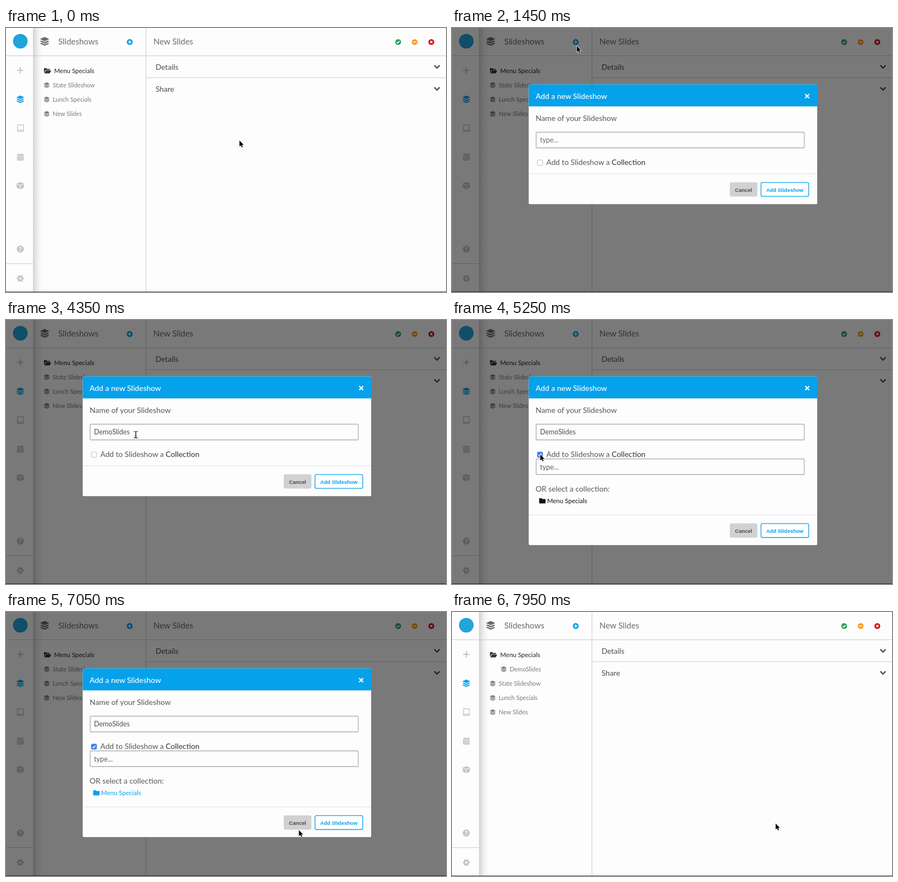
Write an HTML page that moves like this. It is 800 px wide and 480 px high and loops after 8 s.

```html
<!DOCTYPE html>
<html lang="en">
<head>
<meta charset="utf-8">
<title>Slideshows</title>
<style>
  html, body { margin: 0; width: 100%; height: 100%; overflow: hidden; background: #fefdfe; }
  svg { display: block; width: 100%; height: 100%; }
  text { font-family: Lato, "Open Sans", sans-serif; white-space: pre; }
  .btn { font: bold 9.5px "Liberation Sans", Arial, sans-serif; text-anchor: middle; }
</style>
</head>
<body>
<svg id="stage" viewBox="0 0 800 480"></svg>
<script>
const LOOP = 8000, STEP = 50;
const BLUE = '#05a1eb', PALE = '#c5c4c6', GREY = '#7b7a7c';
const NAME = 'DemoSlides';
const stage = document.getElementById('stage');

const text = (x, y, size, fill, str, extra = '') =>
  `<text x="${x}" y="${y}" font-size="${size}" fill="${fill}" ${extra}>${str}</text>`;
const rect = (x, y, w, h, fill, extra = '') =>
  `<rect x="${x}" y="${y}" width="${w}" height="${h}" fill="${fill}" ${extra}/>`;
const line = (d, color, width = 1, extra = '') =>
  `<path d="${d}" fill="none" stroke="${color}" stroke-width="${width}" ${extra}/>`;
const group = (id, body, extra = '') => `<g id="${id}" ${extra}>${body}</g>`;

// Three stacked sheets centred on (x, y)
const layers = (x, y, size, fill) => {
  const sheet = dy => `M.4 ${8 + dy}L2.6 7${dy ? '' : ''}`.slice(0, 0) +
    `M.4 ${8 + dy}l2-1L8 ${9.6 + dy}l5.6-2.6l2 1L8 ${11.6 + dy}Z`;
  return `<path transform="translate(${x - size / 2} ${y - size / 2}) scale(${size / 16})" fill="${fill}"
    stroke="${fill}" stroke-width=".6" stroke-linejoin="round" d="M8 .6L15.6 4L8 7.5L.4 4Z${sheet(0)}${sheet(4)}"/>`;
};
const badge = (x, y, r, fill, mark, width = 1.6) =>
  `<g transform="translate(${x} ${y})"><circle r="${r}" fill="${fill}"/>${line(mark, '#fff', width)}</g>`;
const chevron = y => line(`M778.8 ${y - 2.6}l4.8 5l4.8-5`, '#4d4c4e', 2.3);
const folder = (x, y) =>
  `<path d="M${x} ${y + 1.2}q0-1.2 1.2-1.2h3.3l1.4 1.5h4.7q1 0 1 1v5.8q0 1.2-1.2 1.2h-9.200q-1.2 0-1.2-1.2z"/>`;
const row = (x, y, label) => layers(x, y - .2, 10.5, GREY) + text(x + 11, y + 3.8, 11, GREY, label);
const input = y => rect(153, y, 487.5, 28.5, '#fefdfe', 'rx="2" stroke="#c2c0c3" stroke-width="1.8"');

function sidebar() {
  return rect(49, 0, 18, 480, 'url(#shade)') + rect(0, 0, 49.500, 480, '#fefdfe') +
    line('M0 50.500H800M254.500 0V480M255 90.500H800M0 428.500H49', '#cbcacc') +
    line('M49.500 0V480', '#d6d5d7') +
    '<circle cx="26" cy="24" r="13.3" fill="#22a3dc"/>' +
    line('M26 71.200V82.800M20.200 77H31.800', PALE, 2.200) +
    layers(26, 129.500, 14, BLUE) +
    rect(20.800, 176, 10.800, 12, 'none', `rx="1.2" stroke="${PALE}" stroke-width="1.4"`) +
    line('M21 185.800H31.500', PALE, 1.4) +
    rect(20.200, 229.500, 12, 11.500, PALE, 'rx="1.3"') +
    line('M23.500 228v3M29 228v3', PALE, 1.8) +
    line('M20.500 232.700H32', '#fff', .9) +
    line('M22.300 235.600H30.500M22.300 238.600H30.500', '#fff', 1.5, 'stroke-dasharray="1.6 1.7"') +
    `<path d="M26 280.300l6.500 2.500v7.500L26 293.300l-6.500-3v-7.500Z" fill="${PALE}"/>` +
    line('M21 284l5 2l5-2M26 286.500v5.500', '#fff', 1.1) +
    `<circle cx="26" cy="402" r="6.400" fill="${PALE}"/>` +
    text(26, 405.800, 10.500, '#fff', '?', 'text-anchor="middle" font-weight="900"') +
    `<circle cx="26" cy="455.400" r="3.500" fill="none" stroke="${PALE}" stroke-width="3"/>` +
    `<circle cx="26" cy="455.400" r="5.500" fill="none" stroke="${PALE}" stroke-width="1.9" pathLength="12" stroke-dasharray="1" stroke-dashoffset=".5"/>`;
}

function page() {
  return rect(0, 0, 800, 480, '#fefdfe') + sidebar() +
    layers(70.300, 24.200, 16.500, '#6a696b') + text(95, 29.500, 15, '#6c6b6d', 'Slideshows') +
    badge(225, 25.500, 5.400, BLUE, 'M0-3V3M-3 0H3') +
    text(268, 29.500, 15, '#6c6b6d', 'New Slides') +
    badge(713, 25.500, 5.300, '#27a558', 'M-2.700 .2L-.8 2L2.700-1.700') +
    badge(743, 25.500, 5.300, '#fa9d1c', 'M-3 0H3') +
    badge(773.300, 25.500, 5.300, '#d10f14', 'M-1.900-1.900L1.900 1.900M1.900-1.900L-1.900 1.900') +
    text(272, 75.500, 13.600, '#4d4c4e', 'Details') + chevron(70.500) +
    text(272, 115.500, 13.700, '#4d4c4e', 'Share') + chevron(110.500) +
    '<path fill="#333234" d="M69 81.500V74q0-1 1-1h3.300l1.400 1.400h4.300q1 0 1 1V76.500H72.600q-.8 0-1.200 .7ZM69.600 82.600l2.500-4.600q.4-.7 1.200-.7h8.200q.8 0 .4 .7l-2.200 4q-.3 .6-1.100 .6Z"/>' +
    text(87.500, 82, 11.500, '#333234', 'Menu Specials', 'font-weight="500"') +
    group('added', row(94, 104, NAME)) +
    group('rows', row(74, 104, 'State Slideshow') + row(74, 130.100, 'Lunch Specials') + row(74, 156.200, 'New Slides')) +
    rect(0, 479, 800, 1, '#59575a');
}

function modal() {
  const label = '#575658';
  return rect(139.500, 102.500, 524.500, 217.800, '#fefdfe', 'id="sheet" rx="2"') +
    `<path d="M139.500 142.500V104.500q0-2 2-2H662q2 0 2 2V142.500Z" fill="${BLUE}"/>` +
    text(152, 128.800, 13.900, '#fff', 'Add a new Slideshow', 'font-weight="500"') +
    line('M642.200 120.300l7.200 7.200M649.400 120.300l-7.200 7.200', '#fff', 2.300) +
    text(152, 168.600, 13.900, label, 'Name of your Slideshow') +
    input(189.500) + text(160, 208, 12.500, '#4f4e50', '', 'id="field"') +
    rect(161, 197, 1, 14, '#222', 'id="caret"') +
    rect(155.200, 240, 9.600, 9.600, '#fff', 'id="box" rx="2" stroke-width=".9"') +
    text(171.500, 248.600, 13.750, label, 'Add to Slideshow a <tspan fill="#414042" font-weight="500">Collection</tspan>') +
    group('extra',
      line('M157.500 245l1.900 2.100l3.200-4.300', '#fff', 1.5) +
      input(252.500) + text(160, 271.500, 12.700, '#5d5c5e', 'type...') +
      text(152, 311.500, 13.800, label, 'OR select a collection:') +
      group('choice', folder(158.500, 324) + text(173, 332.800, 11.500, 'inherit', 'Menu Specials').replace('fill="inherit"', ''))) +
    group('foot',
      line('M139.500 265H664', '#dddcde') +
      rect(505, 280.500, 50.300, 26, '#d1d0d2', 'rx="3"') +
      text(530.200, 297.500, 9.500, '#4a494b', 'Cancel', 'class="btn"') +
      rect(561.800, 280.800, 86.800, 25.400, '#fff', `rx="3" stroke="${BLUE}" stroke-width="1.3"`) +
      text(605.200, 297.500, 9.500, BLUE, 'Add Slideshow', 'class="btn"'));
}

const outlined = 'fill="#000" stroke="#fff" stroke-width="1.3" stroke-linejoin="round" paint-order="stroke"';
const arms = 'M0-6.500L2.500-3.500H.7V-.7H3.500V-2.500L6.500 0L3.500 2.500V.7H.7V3.500H2.500L0 6.500L-2.500 3.500H-.7V.7H-3.500V2.500L-6.500 0L-3.500-2.500V-.7H-.7V-3.500H-2.500Z';
const pointers = {
  arrow: `<path d="M.5 .5V11.500L3 9.200L4.700 13L6.500 12.200L4.800 8.500H8.200Z" ${outlined}/>`,
  beam: line('M-3.500-6q3 0 3.500 1.500q.5-1.500 3.500-1.500M-3.500 6q3 0 3.500-1.500q.5 1.500 3.500 1.500M0-5V5M-1.500 1.500H1.500', '#fff', 2.600, 'opacity=".6"') +
    line('M-3.500-6q3 0 3.500 1.500q.5-1.500 3.500-1.500M-3.500 6q3 0 3.500-1.500q.5 1.500 3.500 1.500M0-5V5M-1.500 1.500H1.500', '#111', 1.2),
  move: `<path d="${arms}" ${outlined}/>`,
  hand: '<path d="M-1 0q1-1.200 2 0V5l4.500 1.200q1.300 .4 1.100 1.800L6 12.500H.2L-3.500 8q-.3-1.600 1-1.300L-1 8Z" fill="#fff" stroke="#111" stroke-width="1" stroke-linejoin="round"/>'
};

stage.innerHTML =
  `<defs><linearGradient id="shade"><stop stop-color="#000" stop-opacity=".17"/>
   <stop offset=".5" stop-color="#000" stop-opacity=".05"/><stop offset="1" stop-color="#000" stop-opacity="0"/></linearGradient></defs>` +
  page() + group('dialog', rect(0, 0, 800, 480, '#000', 'opacity=".52"') + modal()) +
  group('pointer', Object.entries(pointers).map(([id, art]) => group(id, art)).join(''));

const el = {};
stage.querySelectorAll('[id]').forEach(node => el[node.id] = node);
const show = (node, on) => node.setAttribute('display', on ? 'inline' : 'none');
const clamp = v => Math.min(1, Math.max(0, v));
const ease = v => v * v * (3 - 2 * v);

// time, x, y
const path = [
  [50, 424, 204], [700, 252, 50], [900, 226, 26], [1350, 226, 26], [2250, 240, 208.500],
  [2750, 240, 208.500], [3300, 236, 208.500], [4400, 236, 208.500], [4950, 160, 244],
  [5350, 160, 244], [5900, 179.500, 309.500], [6100, 196, 327], [6350, 196, 327],
  [6800, 510, 380], [7050, 532, 396], [7400, 588, 384]
];
// time from which each pointer shape holds
const shapes = [
  [0, 'arrow'], [700, 'move'], [800, 'arrow'], [850, 'hand'], [1400, 'arrow'], [2100, 'beam'],
  [4700, 'arrow'], [5650, 'beam'], [6050, 'hand'], [6450, 'arrow'], [7250, 'hand'], [7750, 'arrow']
];

function pointerAt(t) {
  const i = path.findIndex(p => p[0] > t);
  if (i === 0) return path[0].slice(1);
  if (i < 0) return path[path.length - 1].slice(1);
  const [t0, x0, y0] = path[i - 1], [t1, x1, y1] = path[i];
  const k = ease((t - t0) / (t1 - t0));
  return [x0 + (x1 - x0) * k, y0 + (y1 - y0) * k];
}

function draw(t) {
  const fade = ease(clamp((t - 1150) / 250)) * (1 - ease(clamp((t - 7700) / 200)));
  el.dialog.setAttribute('opacity', fade);
  show(el.dialog, fade > 0);

  const saved = t >= 7800;
  show(el.added, saved);
  el.rows.setAttribute('transform', `translate(0 ${saved ? 26.100 : 0})`);

  const typed = NAME.slice(0, Math.max(0, Math.floor((t - 2850) / 125)));
  el.field.textContent = typed || 'type...';
  el.field.setAttribute('fill', typed ? '#4f4e50' : '#6b6a6c');
  const typing = typed && t < 4200;
  const blink = (t + 350) % 1000 < 550;
  show(el.caret, t >= 1500 && t < 5200 && (typing || blink));
  el.caret.setAttribute('x', typed ? 160.800 + el.field.getComputedTextLength() : 160.800);

  const open = t >= 5250;
  show(el.extra, open);
  el.sheet.setAttribute('height', open ? 306.800 : 217.800);
  el.foot.setAttribute('transform', `translate(0 ${open ? 89.300 : 0})`);
  el.box.setAttribute('fill', open ? '#3b7ff3' : '#fff');
  el.box.setAttribute('stroke', open ? '#3b7ff3' : '#b5b4b6');
  el.choice.setAttribute('fill', t >= 6200 ? BLUE : '#111');

  const shape = shapes.filter(s => s[0] <= t).pop()[1];
  for (const id in pointers) show(el[id], id === shape);
  el.pointer.setAttribute('transform', `translate(${pointerAt(t)})`);
}

const start = performance.now();
function tick(now) {
  const t = Math.max(0, now - start) % LOOP;
  draw(Math.floor(t / STEP) * STEP);
  requestAnimationFrame(tick);
}
draw(0);
requestAnimationFrame(tick);
</script>
</body>
</html>
```
